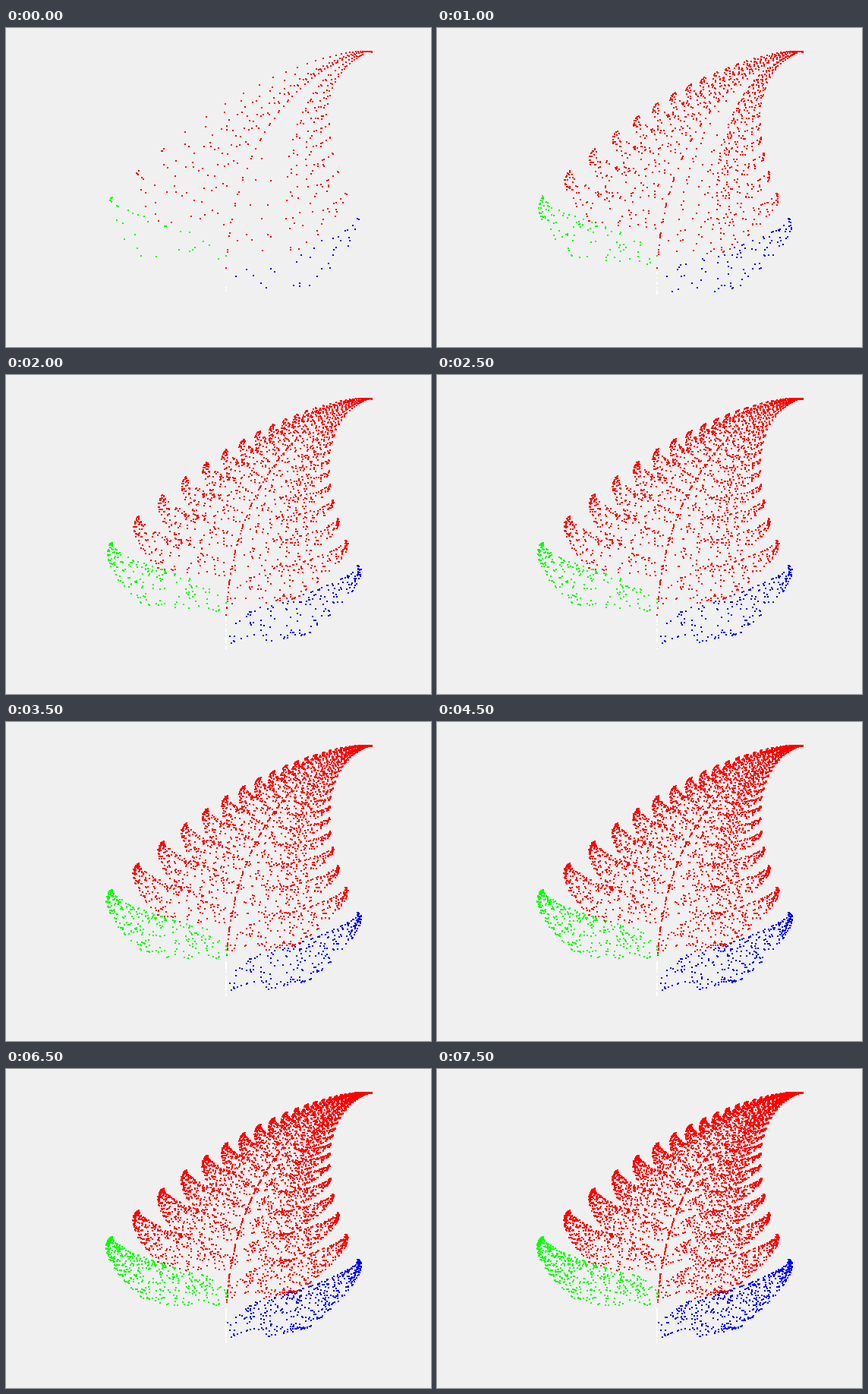
An HTML page with a canvas that plays this animation: 560 by 420 pixels, repeating every 8 s.

```html
<!DOCTYPE html>
<html lang="en">
<head>
<meta charset="utf-8">
<title>Growing fern</title>
<style>
  html, body { margin: 0; width: 100%; height: 100%; overflow: hidden; background: #f0f0f0; }
  canvas { display: block; }
</style>
</head>
<body>
<canvas id="stage" width="560" height="420"></canvas>
<script>
const LOOP = 8000, STEP = 500, BATCH = 500, DOT = 2;
const ctx = document.getElementById('stage').getContext('2d');

// Affine maps: x' = a x + b y, y' = c x + d y + f, chosen while r < upTo
const maps = [
  { upTo: 0.006, a: 0, b: 0, c: 0, d: 0.16, f: 0, color: '#fff' },
  { upTo: 0.86, a: 0.85, b: 0.04, c: -0.04, d: 0.85, f: 1.6, color: '#f00' },
  { upTo: 0.93, a: 0.2, b: -0.26, c: 0.23, d: 0.22, f: 1.6, color: '#0f0' },
  { upTo: 1, a: -0.15, b: 0.28, c: 0.26, d: 0.24, f: 0.44, color: '#00f' }
];

function seeded(seed) {
  return () => {
    seed = (seed + 0x6D2B79F5) | 0;
    let t = Math.imul(seed ^ (seed >>> 15), 1 | seed);
    t = (t + Math.imul(t ^ (t >>> 7), 61 | t)) ^ t;
    return ((t ^ (t >>> 14)) >>> 0) / 4294967296;
  };
}

function growFern(count) {
  const random = seeded(2024);
  const points = [];
  let x = 0, y = 0;
  for (let i = 0; i < count; i++) {
    const r = random();
    const m = maps.find(k => r < k.upTo);
    [x, y] = [m.a * x + m.b * y, m.c * x + m.d * y + m.f];
    points.push({
      px: Math.floor(289.4 + 72.5 * x),
      py: Math.floor(370 - 34 * y),
      color: m.color
    });
  }
  return points;
}

const points = growFern(BATCH * LOOP / STEP);
let drawn = 0;

function show(time) {
  const target = BATCH * (Math.floor((time % LOOP) / STEP) + 1);
  if (target < drawn) {
    ctx.clearRect(0, 0, 560, 420);
    drawn = 0;
  }
  for (; drawn < target; drawn++) {
    const p = points[drawn];
    ctx.fillStyle = p.color;
    ctx.fillRect(p.px, p.py, DOT, DOT);
  }
}

const start = performance.now();
function tick() {
  show(performance.now() - start);
  requestAnimationFrame(tick);
}
tick();
</script>
</body>
</html>
```
